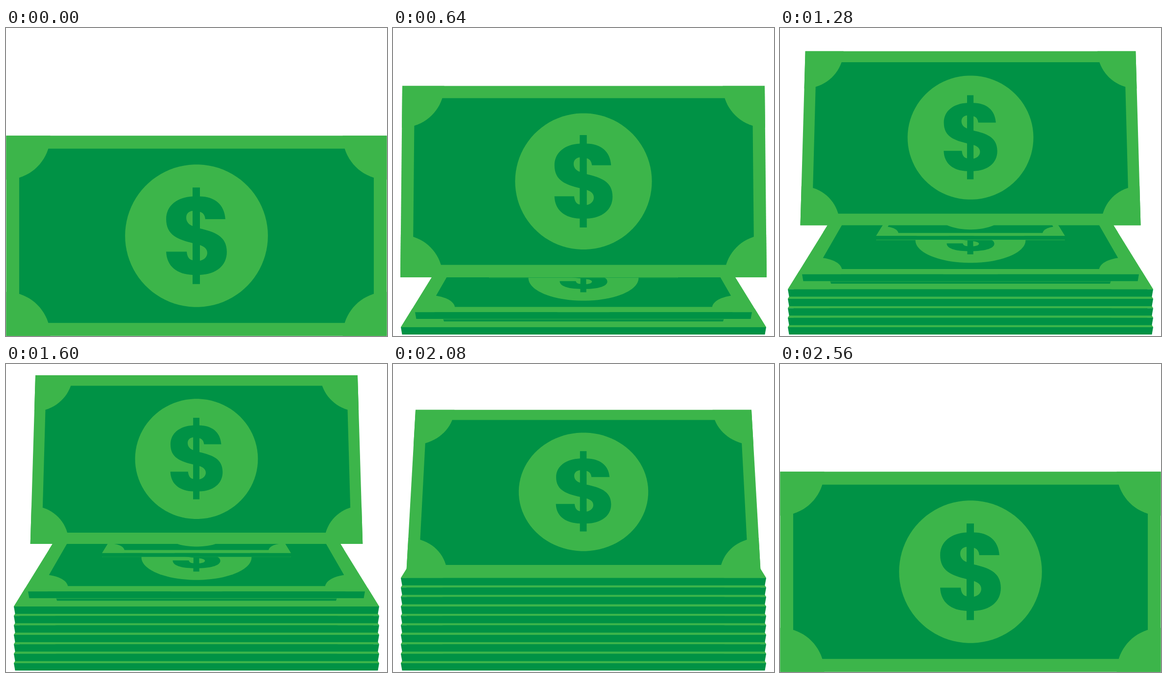
Animation, 778 px wide and 630 px high, one loop 2.88 s. Source, as an HTML page with a canvas:

```html
<!DOCTYPE html>
<html>
<head>
<meta charset="utf-8">
<style>
  html, body { margin: 0; height: 100%; overflow: hidden; background: #fff; }
  canvas { display: block; }
</style>
</head>
<body>
<canvas id="stage" width="778" height="630"></canvas>
<script>
const ctx = document.getElementById('stage').getContext('2d');
const LIGHT = '#3cb54a', DARK = '#009245';
const STEP = 80, LOOP = 2880, LAST = 32;

// A flat bill is designed on x 0..778, y 0..410 and then projected.
const DOLLAR = 'M448,171 L407,171 C406,163 403,158 396,156 L396,190 C425,197 451,205 451,238 ' +
  'C451,267 428,284 396,285 L396,304 L381,304 L381,285 C350,284 328,268 327,237.5 L369,237.5 ' +
  'C370,248 374,254 381,255 L381,220 C353,213 327,205 327,171 C327,143 350,126 381,124.5 ' +
  'L381,106 L396,106 L396,124.5 C425,125 446,140 448,171 Z ' +
  'M381,154 C373,155 368,160 368,168 C368,176 373,182 381,185 Z ' +
  'M396,224 C405,227 411,232 411,240 C411,248 405,254 396,256 Z';

// Edges of the big bill: [step, top y, bottom y, top left x, bottom left x]
const RISE = [
  [0, 220.3, 629.7, 0.5, 0.5],
  [7, 129, 525, 15, 11.5],
  [8, 118.5, 510, 19, 15],
  [12, 78.3, 452.6, 35.5, 28],
  [14, 61.3, 428, 43.5, 34.5],
  [16, 47.5, 403.5, 51.7, 41.5],
  [21, 17, 361, 61, 51.5],
  [24, 0.5, 351.5, 56, 56]
];
const FALL = [RISE[7], [28, 166, 509.5, 34, 6], [LAST, ...RISE[0].slice(1)]];

// Smooth cubic interpolation of column c
function sample(keys, c, t) {
  const secant = (i, j) => (keys[j][c] - keys[i][c]) / (keys[j][0] - keys[i][0]);
  const end = keys.length - 1;
  const slope = i =>
    i === 0 ? 1.5 * secant(0, 1) - 0.5 * secant(0, 2) :
    i === end ? 1.5 * secant(end - 1, end) - 0.5 * secant(end - 2, end) :
    secant(i - 1, i + 1);
  let i = 0;
  while (i < end - 1 && t >= keys[i + 1][0]) i++;
  const span = keys[i + 1][0] - keys[i][0], u = (t - keys[i][0]) / span, v = 1 - u;
  return v * v * (1 + 2 * u) * keys[i][c] + u * u * (3 - 2 * u) * keys[i + 1][c] +
    span * u * v * (v * slope(i) - u * slope(i + 1));
}

function fill(points, color) {
  ctx.fillStyle = color;
  ctx.beginPath();
  points.forEach(p => ctx.lineTo(...p));
  ctx.fill();
}

function arc(cx, cy, r, from, sweep, n) {
  return Array.from({ length: n + 1 }, (_, i) => {
    const a = from + sweep * i / n;
    return [cx + r * Math.cos(a), cy + r * Math.sin(a)];
  });
}

function bill(topY, topW, bottomY, bottomW) {
  const project = ([x, y]) => {
    const a = (1 - y / 410) / topW, b = y / 410 / bottomW;
    return [389 + (x / 778 - 0.5) / (a + b), (a * topY + b * bottomY) / (a + b)];
  };
  const shape = (points, color) => fill(points.map(project), color);
  const box = m => [[m, m], [778 - m, m], [778 - m, 410 - m], [m, 410 - m]];
  shape(box(0), LIGHT);
  shape(box(26.5), DARK);
  box(0).forEach(([x, y], i) =>
    shape([[x, y], ...arc(x, y, 90, i * Math.PI / 2, Math.PI / 2, 20)], LIGHT));
  shape(arc(389, 205, 146, 0, 2 * Math.PI, 90), LIGHT);
  const dollar = DOLLAR.replace(/([\d.]+),([\d.]+)/g, (_, x, y) =>
    project([+x, +y]).map(n => n.toFixed(2)).join());
  ctx.fillStyle = DARK;
  ctx.fill(new Path2D(dollar), 'evenodd');
}

// A bill lying flat, with its thick front edge
function flatBill(y, scale) {
  const w = 746 * scale, topW = 0.766 * w;
  const edge = (y1, y2, inset) => [
    [389 - w / 2, y1], [389 + w / 2, y1],
    [389 + w / 2 - inset, y2], [389 - w / 2 + inset, y2]
  ];
  bill(y - 0.81 * (w - topW), topW, y, w);
  const bottom = y + 15 * scale;
  if (scale < 1) fill(edge(bottom, bottom + 0.7, 0), LIGHT);
  fill(edge(y, bottom, 2.6 * scale), DARK);
}

function draw(step) {
  ctx.clearRect(0, 0, 778, 630);
  // Bills fly in from behind and land on the pile every second step
  for (let k = 0; k < 10; k++) {
    const left = Math.max(0, 7 + 2 * k - step);
    const scale = 1 - 0.078 * left ** 1.66;
    if (scale > 0.05) flatBill(612 - 19.35 * k - 146 * (1 - scale), scale);
  }
  const keys = step < 24 ? RISE : FALL;
  const [topY, bottomY, topX, bottomX] = [1, 2, 3, 4].map(c => sample(keys, c, step));
  bill(topY, 778 - 2 * topX, bottomY, 778 - 2 * bottomX);
}

function tick() {
  draw(Math.min(LAST, Math.floor(performance.now() % LOOP / STEP)));
  requestAnimationFrame(tick);
}
tick();
</script>
</body>
</html>
```
